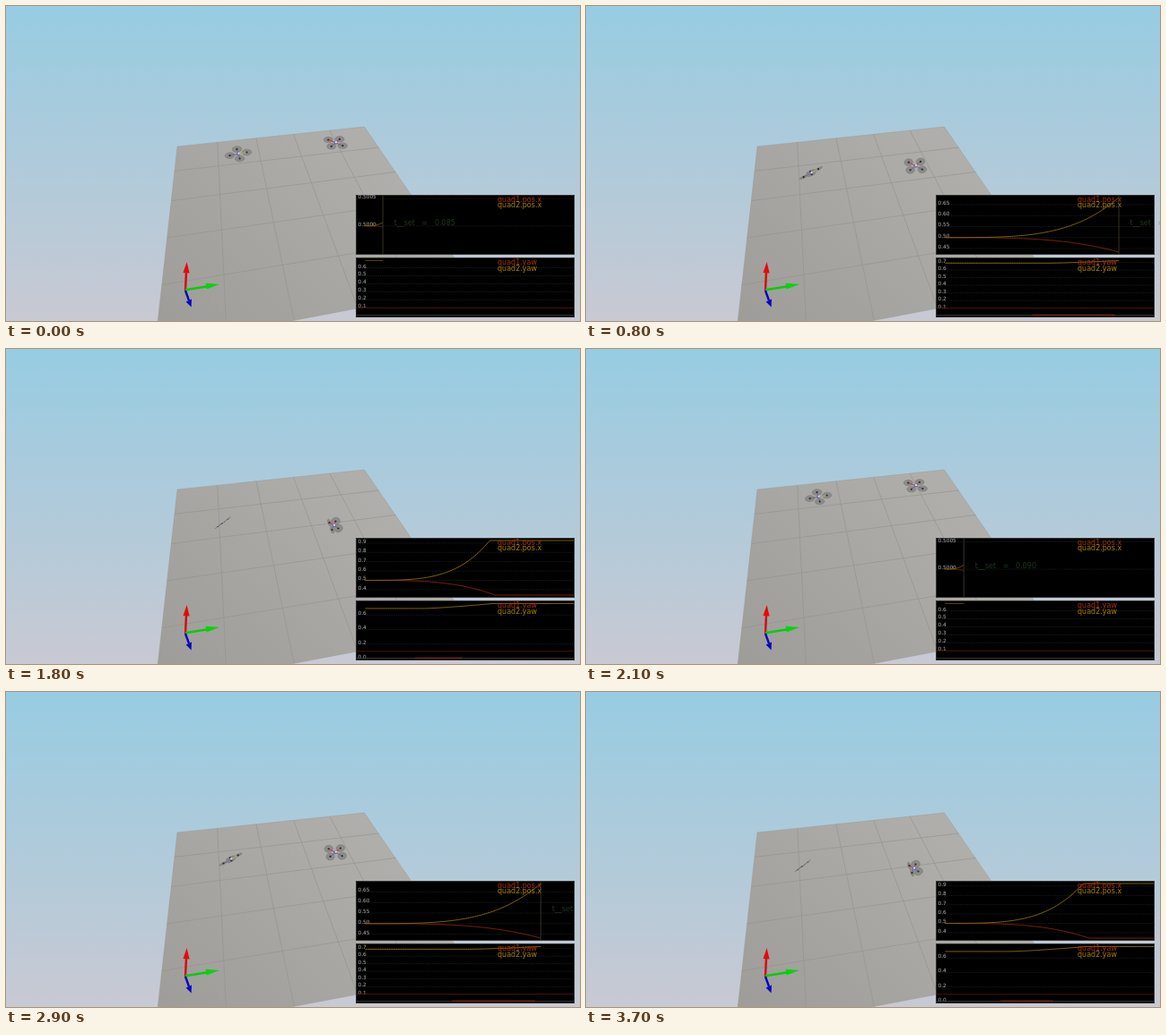
These frames come from a looping animation (640x352 px, 3800 ms). An HTML page:

```html
<!DOCTYPE html>
<html lang="en">
<head>
<meta charset="utf-8">
<title>Two quadrotors</title>
<style>
html, body { margin: 0; width: 100%; height: 100%; overflow: hidden; }
svg { display: block; width: 100vw; height: 100vh; }
text { font: 8px "DejaVu Sans", sans-serif; }
.tick { font-size: 5.8px; fill: #b4b4b4; }
.grid { stroke: #242424; stroke-width: .8; stroke-dasharray: 1 1; }
.panel { stroke: #343434; }
.q1 { stroke: #8a2608; }
.q2 { stroke: #8e7000; }
.curve { fill: none; stroke-width: .9; stroke-linejoin: round; }
</style>
</head>
<body>
<svg id="stage" viewBox="0 0 640 352" preserveAspectRatio="none">
  <defs>
    <linearGradient id="sky" x2="0" y2="1">
      <stop stop-color="#97cce2"/><stop offset="1" stop-color="#c8c9d3"/>
    </linearGradient>
    <linearGradient id="floor" gradientUnits="userSpaceOnUse" x1="180" y1="352" x2="380" y2="140">
      <stop stop-color="#9f9d9a"/><stop offset="1" stop-color="#b0aeab"/>
    </linearGradient>
  </defs>
  <rect width="640" height="352" fill="url(#sky)"/>
  <polygon points="191,157 399.5,135 521.5,313 166,381" fill="url(#floor)" stroke="#949491" stroke-width=".4"/>
  <path id="tiles" fill="none" stroke="#949491" stroke-width=".7"/>
  <g id="drones"></g>
  <g stroke-width="2.4">
    <path d="M200 318L201 297" stroke="#d80808"/>
    <path d="M197.5 298L201.6 286L204.6 298.5Z" fill="#e80808"/>
    <path d="M200 317.3L225 313.3" stroke="#06cc0a"/>
    <path d="M222.6 309.8L238 311.1L223.6 316.6Z" fill="#06d40a"/>
    <path d="M200 318L204 329" stroke="#0808b8"/>
    <path d="M200.6 330.6L206.6 336.6L207 327.6Z" fill="#0808c8"/>
  </g>
  <g id="panels"></g>
</svg>
<script>
const $ = id => document.getElementById(id);
const STOP1 = 1.095, STOP2 = 1.05;   // moments the quadrotors hit the floor
const X0 = 400.5;

// Perspective floor: unit square to the stage
function floorPoint(u, v) {
  const g = .089, h = -.4434, w = 1 + g * u + h * v;
  const x = 191 + (400 * (1 + g) - 191) * u + (166 * (1 + h) - 191) * v;
  const y = 157 + (135 * (1 + g) - 157) * u + (381 * (1 + h) - 157) * v;
  return (x / w).toFixed(1) + ' ' + (y / w).toFixed(1);
}
let tiles = '';
for (let i = 1; i < 5; i++) {
  const s = i / 5;
  tiles += `M${floorPoint(s, 0)}L${floorPoint(s, 1)}M${floorPoint(0, s)}L${floorPoint(1, s)}`;
}
$('tiles').setAttribute('d', tiles);

// Poses: centre, first arm, second arm, rotor radii, rotor angle, width of the far rotors
const KEYS = [.085, .47, .834, STOP1];
const RIGHT = [
  [367.4, 152.8, -8.1, -3.3, 4.6, -4, 5.1, 3.2, 0, 1],
  [367, 160.2, -8.1, -3.3, 4.7, -4, 5, 3.4, 0, 1],
  [367.3, 178.4, -7.6, -4, 5.7, -4.7, 4.8, 3.9, -8, 1],
  [365.5, 197.3, -5, -3.2, 2, -4.8, 5, 4.1, -18, .3]
];
const LEFT = [
  [259, 165.3, -9.5, 1.8, -1.6, -5.2, 5.3, 3.3, -4, 1],
  [259.6, 172.8, -9.4, 3, -1.3, -4.3, 5.2, 2.9, -12, 1],
  [251, 186.5, -8.2, 4.5, -.8, -1.6, 5, 1.2, -27, 1],
  [241.7, 194.3, -5.6, 4.2, 1, -.6, 3.8, .3, -36, 1]
];

// Smooth curve through all four poses
function poseAt(poses, t) {
  const weights = KEYS.map((a, i) =>
    KEYS.reduce((p, b, j) => i === j ? p : p * (t - b) / (a - b), 1));
  return poses[0].map((_, c) => poses.reduce((sum, p, i) => sum + p[c] * weights[i], 0));
}

function drone(poses, t, color, marked) {
  const [x, y, ax, ay, bx, by, rx, ry, turn, far] = poseAt(poses, t);
  const rotors = [[x + ax, y + ay, far], [x + bx, y + by, 1],
                  [x - bx, y - by, far], [x - ax, y - ay, 1]];
  const flat = Math.max(.3, ry);
  const line = ([px, py], c) =>
    `<path d="M${x} ${y}L${px} ${py}" stroke="${c}" stroke-width="${Math.min(1, flat)}"/>`;
  const spot = (px, py, r, c) =>
    `<ellipse cx="${px}" cy="${py}" rx="${r}" ry="${Math.min(r, flat)}" fill="${c}"/>`;
  return rotors.map(([px, py, w]) =>
    `<ellipse rx="${rx * w}" ry="${flat}" transform="translate(${px} ${py}) rotate(${turn})"
      fill="#8b8b8a" stroke="#777776" stroke-width=".5"/>`).join('') +
    rotors.map((r, i) => line(r, marked.includes(i) ? color : '#6d6c76')).join('') +
    rotors.map(([px, py]) => spot(px, py, 1.1, '#2a2a38')).join('') +
    spot(x, y, 2, '#6870b4') + spot(x + .6, y - .6, 1.1, '#e4dee2');
}

// Plotted quantities
const grow = (s, end, p, q) =>
  s > 0 ? end * Math.min(s, 1) ** (p + q * Math.log(Math.min(s, 1))) : 0;
const pos1 = t => .5 - grow(t / STOP1, .159, 3.26, -.08);
const pos2 = t => .5 + grow(t / STOP2, .428, 3.82, .13);
const yaw2 = t => .69 + .067 * Math.max(0, Math.min(1, (t - .5) / .57)) ** 1.3;

const scaleX = now => Math.min(231, 232.5 / now);

function niceStep(range, px) {
  const least = 8.3 * range / px;
  for (let k = -4; k < 1; k++)
    for (const m of [1, 2, 5]) {
      const step = m * 10 ** k;
      if (step > least && step > 4e-4) return step;
    }
  return 1;
}

function ticks(lo, hi, top, bottom) {
  const step = niceStep(hi - lo, bottom - top);
  const digits = Math.max(1, -Math.floor(Math.log10(step) + 1e-6));
  let out = '';
  for (let i = Math.ceil(lo / step); i * step <= hi; i++) {
    const y = bottom - (i * step - lo) / (hi - lo) * (bottom - top);
    out += `<path class="grid" d="M391 ${y}H633"/>` +
      `<text class="tick" x="392.5" y="${y}">${(i * step).toFixed(digits)}</text>`;
  }
  return out;
}

function curve(fn, now, lo, hi, top, bottom, cls) {
  const points = [], n = 120;
  for (let i = 0; i <= n; i++) {
    const t = now * i / n;
    const y = bottom - (fn(t) - lo) / (hi - lo) * (bottom - top);
    points.push((X0 + t * scaleX(now)).toFixed(2) + ',' + y.toFixed(2));
  }
  return `<polyline class="curve ${cls}" points="${points.join(' ')}"/>`;
}

const box = (y, h) => `<rect class="panel" x="390.5" y="${y + .5}" width="243" height="${h - 1}"/>`;

const legend = (name, y) =>
  `<text x="548" y="${y}" fill="#a8300c">quad1.${name}</text>` +
  `<text x="548" y="${y + 6.7}" fill="#a88400">quad2.${name}</text>`;

function positionPanel(now) {
  const top = 214, bottom = 275;
  const low = pos1(now), high = pos2(now);
  const mid = (low + high) / 2, half = Math.max(.0005, (high - low) / 2);
  const lo = mid - half, hi = mid + half;
  const x = X0 + now * scaleX(now);
  const cursor = now < 1
    ? `<path d="M${x} 211.5V277" stroke="#453f2c" stroke-width=".8"/>
       <text x="${x + 12.5}" y="245" fill="#3c6e37" fill-opacity=".5">t__set\u00a0\u00a0\u00a0=\u00a0\u00a0\u00a0${now.toFixed(3)}</text>`
    : '';
  return box(211, 67) + ticks(lo, hi, top, bottom) +
    curve(pos1, now, lo, hi, top, bottom, 'q1') +
    curve(pos2, now, lo, hi, top, bottom, 'q2') +
    legend('pos.x', 218.5) + cursor;
}

function yawPanel(now) {
  const lo = now > .9 ? -.002 : .002, hi = yaw2(now);
  const top = 284.5, bottom = 346;
  const limit = bottom - (.1 - lo) / (hi - lo) * (bottom - top);
  const from = X0 + .42 * scaleX(now), to = X0 + Math.min(.82, now) * scaleX(now);
  return box(281, 67) + ticks(lo, hi, top, bottom) +
    `<path d="M391 ${limit}H633" stroke="#54120a" stroke-width=".9"/>` +
    '<path d="M391 345.5H633" stroke="#424244" stroke-width=".8"/>' +
    (now > .42 ? `<path d="M${from} 345.2H${to}" stroke="#a42a10" stroke-width=".9"/>` : '') +
    curve(yaw2, now, lo, hi, top, bottom, 'q2') +
    legend('yaw', 289);
}

// Two runs per loop; the second starts slightly later in simulation time
function simTime(step) {
  const second = step >= 21, k = second ? step - 21 : step;
  const t = k <= 4 ? .085 + .09625 * k : .47 + .092 * (k - 4);
  return second ? t + .005 + .0005 * k : t;
}

let shown = -1;
function draw(ms) {
  const step = Math.floor(ms % 3800 / 100);
  if (step === shown) return;
  shown = step;
  const now = simTime(step), t = Math.min(now, STOP1);
  $('drones').innerHTML = drone(LEFT, t, '#b9ad55', [3]) + drone(RIGHT, t, '#c83838', [0, 1]);
  $('panels').innerHTML = positionPanel(now) + yawPanel(now);
}

const start = performance.now();
function loop() {
  draw(performance.now() - start);
  requestAnimationFrame(loop);
}
loop();
</script>
</body>
</html>
```
